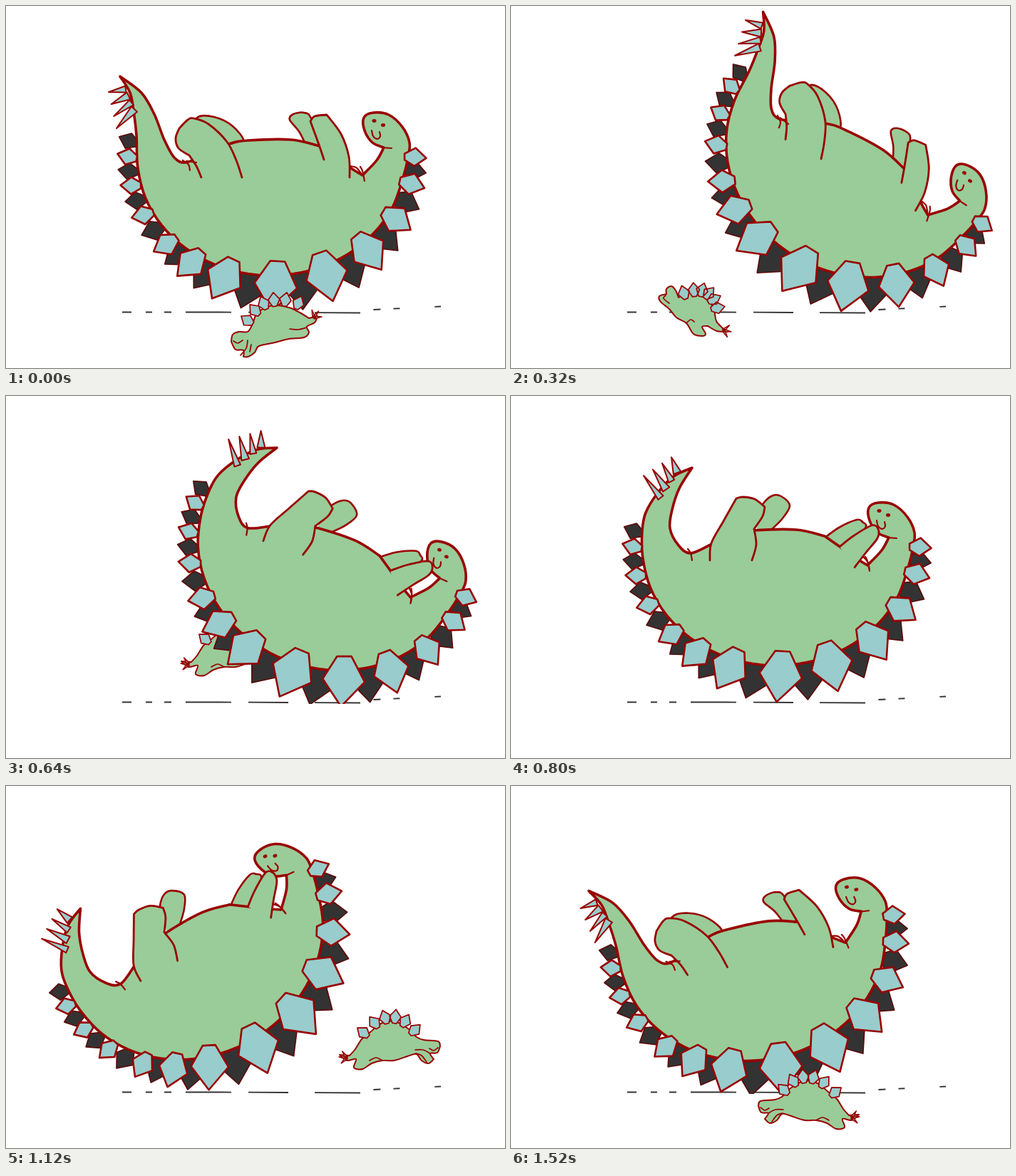
An HTML page with a canvas for the animation above (1.6 s loop, 700x509 px).

```html
<!DOCTYPE html>
<html lang="en">
<head>
<meta charset="utf-8">
<title>Rocking stegosaurus</title>
<style>
html, body { margin: 0; width: 100%; height: 100%; overflow: hidden; background: #fff; }
canvas { display: block; width: 700px; height: 509px; }
</style>
</head>
<body>
<canvas id="stage" width="700" height="509"></canvas>
<script>
const ctx = document.getElementById('stage').getContext('2d');
const RED = '#990000', SKIN = '#99cc99', BLUE = '#99cccc', DARK = '#333333';
const STEP = 80, STEPS = 20, SWING = 30, PIVOT = [371.5, 212];

const rad = deg => deg * Math.PI / 180;
const mix = (a, b, t) => a + (b - a) * t;
const points = s => s.trim().split(/\s+/).map(p => p.split(',').map(Number));

// Smooth curve through the points; "/" marks a sharp corner.
function curve(text, closed) {
  const path = new Path2D();
  let last = null;
  for (const part of text.split('/')) {
    const p = points(part);
    if (last) p.unshift(last); else path.moveTo(...p[0]);
    for (let i = 0; i < p.length - 1; i++) {
      const a = p[Math.max(i - 1, 0)], b = p[i], c = p[i + 1], d = p[Math.min(i + 2, p.length - 1)];
      path.bezierCurveTo(
        b[0] + (c[0] - a[0]) / 6, b[1] + (c[1] - a[1]) / 6,
        c[0] - (d[0] - b[0]) / 6, c[1] - (d[1] - b[1]) / 6, c[0], c[1]);
    }
    last = p[p.length - 1];
  }
  if (closed) path.closePath();
  return path;
}

const curves = list => list.map(s => curve(s));

function polygon(path, corners) {
  corners.forEach((p, i) => i ? path.lineTo(...p) : path.moveTo(...p));
  path.closePath();
}

function paint(path, fill, width, stroke = RED) {
  if (fill) { ctx.fillStyle = fill; ctx.fill(path); }
  ctx.strokeStyle = stroke;
  ctx.lineWidth = width;
  ctx.stroke(path);
}

// Back plate: blunt root, wide shoulders, pointed end along the given direction.
function addPlate(path, [x, y], deg, size) {
  const c = Math.cos(rad(deg)) * size, s = Math.sin(rad(deg)) * size;
  const shape = [[-0.48, -0.14], [-0.48, 0.14], [-0.04, 0.42], [0.5, 0.06], [0.02, -0.4]];
  polygon(path, shape.map(([u, v]) => [x + u * c - v * s, y + u * s + v * c]));
}

function addSpike(path, [x, y], [dx, dy], half) {
  const n = half / Math.hypot(dx, dy);
  polygon(path, [[x - dy * n, y + dx * n], [x + dx, y + dy], [x + dy * n, y - dx * n]]);
}

// The curved back and the row of plates follow ellipses round one centre.
const ring = (rx, ry, deg) => [372 + rx * Math.cos(rad(deg)), 212 + ry * Math.sin(rad(deg))];
const plateAngles = [0, 12, 29, 47, 67, 88, 109, 124, 137, 153, 167, 180, 194];
const plateSize = i => 28 + 46 * Math.exp(-(((i - 4.6) / 2.8) ** 2));

function plateRow(offset) {
  const path = new Path2D();
  for (let i = 0; i < 12; i++) {
    const deg = mix(plateAngles[i], plateAngles[i + 1], offset);
    addPlate(path, ring(202, 182, deg), deg * 1.06, plateSize(i + offset));
  }
  return path;
}

const bluePlates = plateRow(0), darkPlates = plateRow(0.5);

let back = '';
for (let deg = 10; deg <= 175; deg += 15) back += ring(188, 167, deg).join() + ' ';

const FRONT = `280,209 / 313,194 340,189 400,188 440,197 / 460,211 484,228 500,238 /
  520,217 530,199 / 514,192 503,175 502,157 515,150 537,153 556,170 566,192 564,213 `;

const bodyShape = (tailTop, tailUnder) => curve(tailTop + FRONT + back + tailUnder, true);

// Four spikes from one tail point to another, turning from direction a to b.
function tailSpikes(from, to, a, b) {
  const path = new Path2D();
  for (let i = 0; i < 4; i++) {
    const at = (p, q) => [mix(p[0], q[0], i / 3), mix(p[1], q[1], i / 3)];
    addSpike(path, at(from, to), at(a, b), i % 2 ? 5.5 : 4.5);
  }
  return path;
}

const poses = {
  back: {
    body: bodyShape('160,99 190,122 208,152 222,188 236,213 252,220 ', '183,182 179,148 174,122 160,99'),
    spikes: tailSpikes([168, 117], [180, 145], [-24, 4], [-25, 27]),
    far: curves(['262,180 268,157 292,156 318,169 334,192 320,212', '425,205 412,178 398,160 403,152 418,150 428,158 440,200']),
    near: curves(['274,241 267,225 257,210 / 242,200 238,186 243,172 / 255,160 264,158 284,166 310,191 323,217 331,241',
      '446,216 439,195 427,162 / 433,155 450,153 / 470,180 481,212 482,241']),
    creases: curves(['248,217 256,223 258,231', '253,218 267,220', '482,225 491,227 498,235'])
  },
  forth: {
    body: bodyShape('254,101 236,130 226,160 223,186 235,210 252,221 ', '184,190 189,164 206,136 228,113 254,101'),
    spikes: tailSpikes([210, 143], [233, 108], [-24, -31], [-8, -22]),
    far: curves(['345,170 354,151 367,140 379,141 391,154 381,172 364,189 345,205', '438,201 460,185 485,174 493,177 497,186 470,215']),
    near: curves(['279,231 281,207 298,176 316,144 / 325,142 342,145 356,156 / 353,169 341,187 / 344,209 338,231',
      '461,212 480,197 506,182 515,187 514,200 498,220 482,241']),
    creases: curves(['248,215 252,221 254,231', '494,226 500,233 503,244'])
  }
};

const face = curves(['528,199 541,200', '513,175 515,183 521,187 525,183 524,177', '497,226 500,232 503,246']);

// Plates stand along a bent back given by start, control and end points; tail is x, y, direction.
function baby(center, body, spine, tail, marks) {
  const plates = new Path2D(), spikes = new Path2D();
  const [a, b, c] = points(spine);
  for (let t = 0; t <= 1; t += 0.2) {
    const at = k => mix(mix(a[k], b[k], t), mix(b[k], c[k], t), t);
    const slope = k => mix(b[k] - a[k], c[k] - b[k], t);
    addPlate(plates, [at(0), at(1)], Math.atan2(slope(1), slope(0)) * 180 / Math.PI - 90, 20);
  }
  if (tail) for (const turn of [-50, 0, 50]) {
    const d = rad(tail[2] + turn);
    addSpike(spikes, tail, [11 * Math.cos(d), 11 * Math.sin(d)], 2);
  }
  return { center, body: curve(body, true), plates, spikes, marks: curves(marks) };
}

const babies = {
  dive: baby([377, 452], `316,472 318,462 327,458 339,458 346,447 353,431 374,421 397,424 412,431 425,439 /
    437,436 / 433,445 422,451 425,459 418,466 397,468 378,473 355,478 349,487 340,493 333,493 / 333,484 322,483 316,472`,
    '338,442 362,400 410,417', [432, 438, -55],
    ['319,471 325,474 332,470', '339,470 337,481 329,491', '344,476 342,486', '398,454 410,455 422,452']),
  gather: baby([325, 452], `267,479 270,469 287,464 298,450 309,430 326,419 345,424 360,436 371,441 / 384,438 /
    377,449 361,453 351,460 347,477 340,486 322,490 311,489 / 311,481 293,476 282,483 270,484 267,479`,
    '292,444 313,394 361,432', [377, 441, -20],
    ['270,474 274,477 279,473', '311,481 320,470 325,468', '331,488 339,470 347,459', '318,474 315,484']),
  turn: baby([258, 428], `218,405 218,398 225,394 231,400 235,410 / 246,403 264,405 278,415 285,428 288,443 297,453 /
    304,458 / 289,457 276,450 / 268,451 273,461 268,464 256,461 246,446 232,438 222,426 210,416 208,408 218,405`,
    '242,403 280,388 290,424', [298, 456, 10],
    ['217,407 214,411 222,418', '246,446 252,441 257,444']),
  front: baby([517, 435], `488,458 487,442 490,425 497,415 512,409 530,411 540,422 546,434 543,444 537,447 545,462 541,469
    533,469 528,460 522,457 525,467 518,471 511,463 503,458 498,463 488,458`,
    '491,417 515,390 541,412', null,
    ['498,437 506,438 511,446 506,454 497,456 490,451 490,442 498,437', '493,447 497,442 503,445 500,451 494,450 493,447',
     '513,448 521,443', '514,460 516,468', '527,446 525,457', '539,430 545,425 547,438']),
  stretch: baby([417, 445], `347,450 350,443 370,441 380,437 392,425 411,415 430,418 446,431 457,440 466,454 474,463 /
    488,462 / 478,470 465,468 468,480 456,482 443,474 428,470 412,470 390,463 380,461 373,470 363,474 356,468 / 361,460 351,459 347,450`,
    '382,427 415,387 455,430', [478, 466, -5],
    ['350,452 356,456 362,453', '361,460 371,455 382,455', '366,472 373,463 381,460', '428,470 437,466 446,470'])
};

// Run round the parent; flipped stretches pass behind it.
const run = [
  { at: 0, look: 'dive', x: 377, y: 452 },
  { at: 2, look: 'gather', x: 325, y: 452 },
  { at: 4, look: 'turn', x: 258, y: 428 },
  { at: 6, look: 'stretch', x: 211, y: 366, flip: true },
  { at: 8, look: 'stretch', x: 317, y: 356, flip: true },
  { at: 12, look: 'stretch', x: 421, y: 345, flip: true },
  { at: 14, look: 'stretch', x: 539, y: 361, flip: true },
  { at: 16, look: 'front', x: 517, y: 435 },
  { at: 19, look: 'stretch', x: 417, y: 445 },
  { at: STEPS, look: 'dive', x: 377, y: 452 }
];

function drawBaby(step, behind) {
  const next = run.findIndex(key => key.at > step);
  const a = run[next - 1], b = run[next];
  if (behind !== !!a.flip) return;
  const t = (step - a.at) / (b.at - a.at), look = babies[a.look];
  ctx.save();
  ctx.translate(mix(a.x, b.x, t), mix(a.y, b.y, t));
  if (a.flip) ctx.scale(-1, 1);
  ctx.translate(-look.center[0], -look.center[1]);
  paint(look.body, SKIN, 2);
  paint(look.plates, BLUE, 1.7);
  paint(look.spikes, BLUE, 1.5);
  look.marks.forEach(m => paint(m, null, 1.7));
  ctx.restore();
}

function drawParent(step) {
  const half = step % 10;
  const swing = (step < 10 ? 1 : -1) * (1 - (1 - half / 5) ** 2);
  const bump = Math.sin(Math.PI * Math.abs(swing));
  const pose = step >= 5 && step < 15 ? poses.forth : poses.back;

  ctx.save();
  ctx.beginPath();
  ctx.rect(0, 0, 700, 433);
  ctx.clip();
  ctx.translate(PIVOT[0] + 116.5 * swing + 9.3 * bump, PIVOT[1] + 7 * bump - 2 * swing * (1 + swing));
  ctx.rotate(rad(SWING * swing));
  ctx.translate(-PIVOT[0], -PIVOT[1]);

  paint(darkPlates, DARK, 1.6, '#5c0808');
  pose.far.forEach(p => paint(p, SKIN, 2.6));
  paint(pose.body, SKIN, 3.6);
  paint(pose.spikes, BLUE, 2);
  paint(bluePlates, BLUE, 2.6);
  pose.near.forEach(p => paint(p, SKIN, 2.8));
  [...pose.creases, ...face].forEach(p => paint(p, null, 2.2));
  ctx.fillStyle = RED;
  for (const [x, y] of [[516.5, 161.5], [529, 167.5]]) {
    ctx.beginPath();
    ctx.ellipse(x, y, 3, 2.4, 0, 0, 7);
    ctx.fill();
  }
  ctx.restore();
}

const ground = new Path2D('M163 430.5 L300 430.5 L497 431.5 L515 427 L610 422.5');

function drawGround() {
  ctx.save();
  ctx.lineCap = 'butt';
  ctx.setLineDash([13, 20, 9, 17, 10, 20, 64, 24, 56, 37, 64, 19, 10, 18, 9, 49, 9, 99]);
  paint(ground, null, 1.8, DARK);
  ctx.restore();
}

function frame() {
  const step = Math.floor(performance.now() / STEP) % STEPS;
  ctx.fillStyle = '#fff';
  ctx.fillRect(0, 0, 700, 509);
  ctx.lineJoin = ctx.lineCap = 'round';
  drawGround();
  drawBaby(step, true);
  drawParent(step);
  drawBaby(step, false);
  requestAnimationFrame(frame);
}
frame();
</script>
</body>
</html>
```
